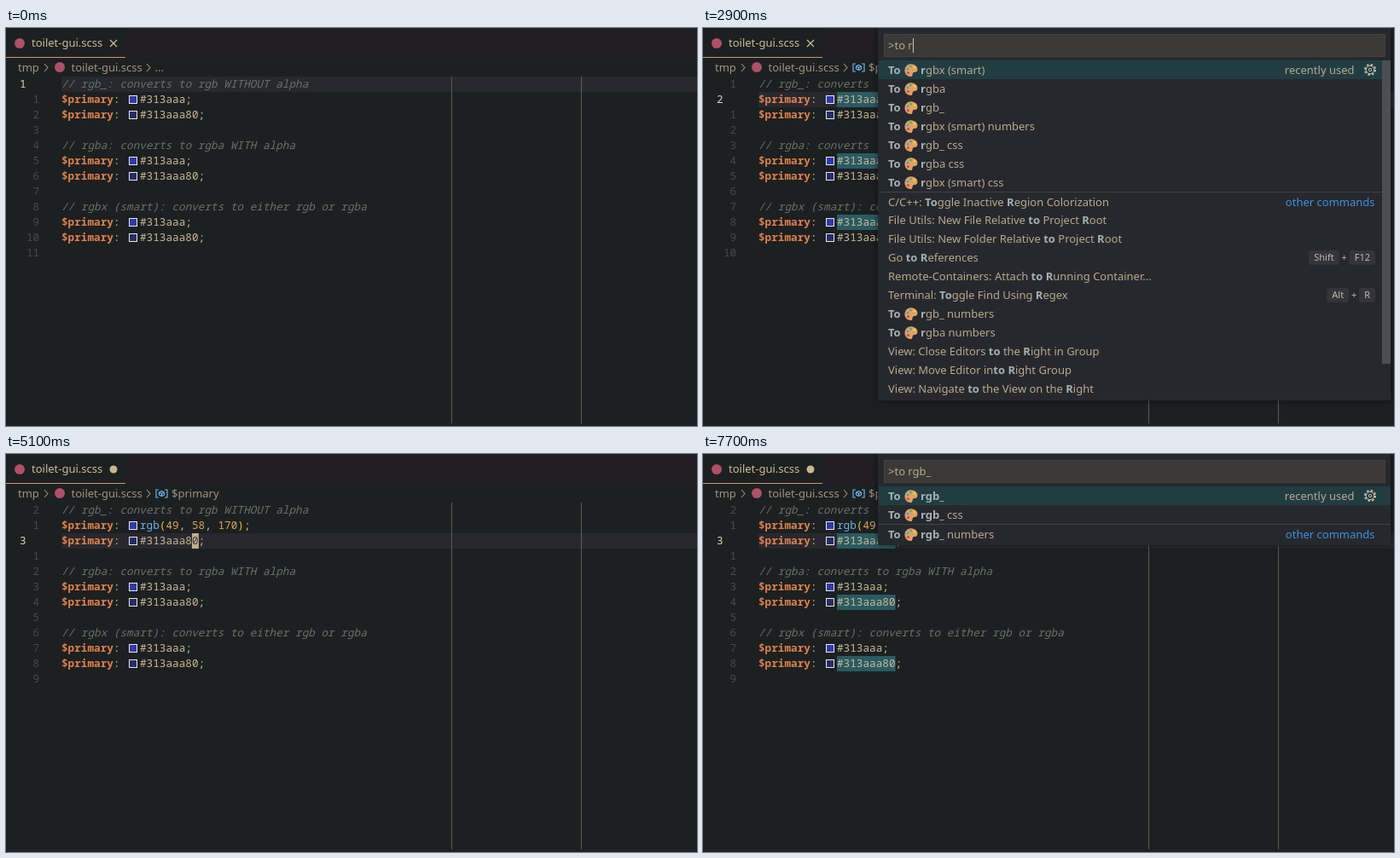
An HTML page that plays this animation: 810x467 px, repeating every 8000 ms.

```html
<!DOCTYPE html>
<html lang="en">
<head>
<meta charset="utf-8">
<title>Colour conversion in an editor</title>
<style>
  html, body { margin: 0; width: 100%; height: 100%; overflow: hidden; background: #1d2021; }
  svg { display: block; width: 810px; height: 467px; }
  text { white-space: pre; font: 13px "Noto Sans", "Open Sans", sans-serif; fill: #b8aa8c; }
  .code { font: 500 12.7px "Noto Sans Mono", "DejaVu Sans Mono", monospace; fill: #c9ba96; }
  .note { font-style: italic; font-weight: 400; fill: #68716c; }
  .var { font-weight: 600; fill: #df824e; }
  .num { fill: #45494b; }
  .now { fill: #ddd2b8; }
  .fn { fill: #6cb4e6; }
  .par { fill: #f0c334; }
  .val { fill: #dca556; }
  .match { font-weight: 700; fill: #a5b3b1; }
  .link { fill: #3e90e0; }
  .key { font-size: 11px; fill: #c4bba6; }
  .path { fill: #a0947c; }
  .tab { fill: #cdbd98; }
  .under { fill: #3c3a35; }
  .box { filter: drop-shadow(0 0 4px rgba(0, 0, 0, .5)); }
</style>
</head>
<body>
<svg id="stage" viewBox="0 0 810 467"></svg>
<script>
const LOOP = 8000, CW = 7.62, LEFT = 65, VALUE = 157, ROW = 22;
const stage = document.getElementById('stage');
const pen = document.createElement('canvas').getContext('2d');

const textWidth = (s, size = 13) => {
  pen.font = `${size}px "Noto Sans", "Open Sans", sans-serif`;
  return pen.measureText(s).width;
};
const esc = s => s.replace(/&/g, '&amp;').replace(/</g, '&lt;').replace(/>/g, '&gt;');
const rect = (x, y, w, h, fill, more = '') =>
  `<rect x="${x}" y="${y}" width="${w}" height="${h}" fill="${fill}" ${more}/>`;
const dot = (x, y, r, fill, more = '') => `<circle cx="${x}" cy="${y}" r="${r}" fill="${fill}" ${more}/>`;
const stroke = (d, color, w = 1) => `<path d="${d}" fill="none" stroke="${color}" stroke-width="${w}"/>`;
const label = (x, y, s, cls = '', more = '') =>
  `<text x="${x}" y="${y}" class="${cls}" ${more}>${esc(s)}</text>`;
const END = 'text-anchor="end"';

// Text between asterisks is emphasised.
const rich = (x, y, s) => `<text x="${x}" y="${y}">` + s.split('*').map((p, i) =>
  i % 2 ? `<tspan class="match">${esc(p)}</tspan>` : esc(p)).join('') + '</text>';

/* ---- editor ---- */
const HEX = '#313aaa', HEXA = '#313aaa80';
const LINES = [
  '// rgb_: converts to rgb WITHOUT alpha', HEX, HEXA, '',
  '// rgba: converts to rgba WITH alpha', HEX, HEXA, '',
  '// rgbx (smart): converts to either rgb or rgba', HEX, HEXA, ''
];
const RGB = [['fn', 'rgb'], ['par', '('], ['val', '49'], ['', ', '], ['val', '58'],
  ['', ', '], ['val', '170'], ['par', ')'], ['', ';']];
const lineY = n => 57 + 18 * (n - 1);
const chevron = x => stroke(`M${x} 42l4 4.5-4 4.5`, '#a0947c', 1.1);

function header(s) {
  const out = rect(0, 0, 810, 35, '#221f22') + rect(0, 0, 140, 35, '#1d2021') +
    rect(0, 34, 140, 1, '#c39a70') +
    dot(16, 18, 6, '#b04f68') + label(30, 22, 'toilet-gui.scss', 'tab') +
    (s.dirty ? dot(126, 18, 4.5, '#c6b792')
      : stroke('M122 14l8 8M130 14l-8 8', '#cdbd98', 1.2)) +
    label(14, 51, 'tmp', 'path') + chevron(45) +
    dot(63, 46, 6, '#b04f68') + label(76.5, 51, 'toilet-gui.scss', 'path') + chevron(165);
  if (!s.crumb) return out + label(174.5, 51, '...', 'path');
  return out + label(194, 51, '$primary', 'path') + stroke(
    'M179 42h-3v9h3M186 42h3v9h-3M179.5 45l3-1.5 3 1.5v3l-3 1.5-3-1.5zl3 1.5 3-1.5M182.5 46.5v3',
    '#6cb4e6', 1.2);
}

function codeLine(str, n, s) {
  const y = lineY(n), base = y + 13;
  if (!str) return '';
  if (str.startsWith('/')) return label(LEFT, base, str, 'code note');
  let out = '';
  if (s.mark === '$primary') out += rect(LEFT, y, 8 * CW, 18, '#2a5a62');
  if (s.mark === str && !(s.dirty && n === 2)) out += rect(VALUE, y, str.length * CW, 18, '#2a5a62');
  out += label(LEFT, base, '$primary', 'code var') + label(LEFT + 8 * CW, base, ':', 'code') +
    rect(144.5, y + 4.5, 9, 9, str === HEX ? '#313aaa' : '#272d65', 'stroke="#e8e8e8"');
  let x = VALUE;
  for (const [cls, part] of s.dirty && n === 2 ? RGB : [['', str + ';']]) {
    out += label(x, base, part, 'code ' + cls);
    x += part.length * CW;
  }
  return out;
}

function editor(s) {
  let out = rect(LEFT, lineY(s.row), 745, 18, '#28282e') +
    rect(522, 57, 1, 410, '#5b5a58') + rect(674, 57, 1, 410, '#5b5a58');
  LINES.forEach((str, i) => {
    const n = i + 1, base = lineY(n) + 13;
    out += n === s.row ? label(16, base, String(n), 'code now')
      : label(39.2, base, String(Math.abs(n - s.row)), 'code num', END);
    out += codeLine(str, n, s);
  });
  if (s.cursor) {
    const [x, ch] = s.cursor, y = lineY(s.row);
    out += rect(x, y, 8, 18, '#bdae8e') + label(x, y + 13, ch, 'code under');
  }
  return out + rect(0, 464, 810, 3, '#221f22');
}

/* ---- command palette ---- */
const TAIL = ['rgbx (smart) numbers', 'rgb_ css', 'rgba css', 'rgbx (smart) css'];
const RECENT = [
  ['#hex_', 'rgbx (smart)', 'rgba', 'rgb_', '#hex (smart)', ...TAIL],
  ['rgb_', '#hex_', 'rgbx (smart)', 'rgba', '#hex (smart)', ...TAIL]
];
const MORE = ['rgb_ numbers', 'rgba numbers'];
const FOR_TO = [
  { name: 'Live Server: S*to*p Live Server', keys: 'Alt+L Alt+C' },
  { name: 'ESLint: Fix all au*to*-fixable Problems' },
  { name: 'Debug: *To*ggle Skipping this File' },
  { name: 'Terminal: Create New Terminal in Editor Area *to* the Side' },
  { name: 'Material *T*heme Icons: Fix icons accent. Based *o*n Material Theme', brush: true, other: true },
  { name: 'Add Cursors *To* Bottom' },
  { name: 'Add Cursors *to* Line Ends', keys: 'Shift+Alt+I' },
  { name: 'Add Cursors *To* Top' },
  { name: 'Add Selection *To* Next Find Match', keys: 'Alt+D' }
];
const FOR_R = [
  { name: 'C/C++: *To*ggle Inactive *R*egion Colorization', other: true },
  { name: 'File Utils: New File Relative *to* Project *R*oot' },
  { name: 'File Utils: New Folder Relative *to* Project *R*oot' },
  { name: 'Go *to* *R*eferences', keys: 'Shift+F12' },
  { name: 'Remote-Containers: Attach *to* *R*unning Container...' },
  { name: 'Terminal: *To*ggle Find Using *R*egex', keys: 'Alt+R' }
];
const FOR_VIEW = [
  { name: 'View: Close Editors *to* the *R*ight in Group' },
  { name: 'View: Move Editor in*to* *R*ight Group' },
  { name: 'View: Navigate *to* the View on the *R*ight' }
];

function commands(query, round) {
  const arg = query.slice(3);
  const convert = name => name[0] === '#' ? { name: '*To* ' + name }
    : { paint: true, name: arg ? `*${arg}*${name.slice(arg.length)}` : name };
  const pick = list => list.filter(n => n.startsWith(arg)).map(convert);
  const recent = pick(RECENT[round]), more = pick(MORE);
  if (!arg) return [...recent, ...FOR_TO];
  if (arg === 'r') return [...recent, ...FOR_R, ...more, ...FOR_VIEW];
  more[0].other = true;
  if (arg === 'rg') more.push({ name: 'View: Move Editor in*to* *R*ight *G*roup' });
  return [...recent, ...more];
}

const paint = y =>
  `<path d="M236.5 ${y + 1}c0-5 4-8.5 9-7.5 5 1 7 5 5.5 8-1.5 2.5-4 .5-5 2.5s0 4-2.5 4c-4 0-7-3-7-7z" fill="#dfa266"/>` +
  dot(240, y - 1, 1.6, '#4c9be0') + dot(243.5, y - 4, 1.6, '#5fae57') +
  dot(248, y - 3, 1.6, '#e7d04c') + dot(240.5, y + 3.5, 1.6, '#d5484a');
const brush = y => stroke(`M222.5 ${y + 2}l8-8.5`, '#3f8fd2', 2.6) +
  stroke(`M218 ${y + 6}q1-4 4-4`, '#c98a54', 3);
const gear = y => dot(782, y, 6, 'none', 'stroke="#c9c1ac" stroke-width="2" stroke-dasharray="2.4 2.31"') +
  dot(782, y, 4.7, 'none', 'stroke="#c9c1ac"') + dot(782, y, 1.7, 'none', 'stroke="#c9c1ac"');

function badges(keys, y) {
  let x = 788, out = '';
  for (const chord of keys.split(' ').reverse()) {
    chord.split('+').reverse().forEach((key, i) => {
      if (i) {
        out += label(x - 6, y + 4, '+', 'key', 'text-anchor="middle"');
        x -= 12;
      }
      const w = textWidth(key, 11) + 12;
      x -= w;
      out += rect(x, y - 8, w, 17, '#34353c', 'rx="3"') + label(x + 6, y + 4, key, 'key');
    });
    x -= 10;
  }
  return out;
}

function palette({ query, round, caret }) {
  const rows = commands(query, round), full = rows.length === 18;
  const w = full ? 590 : 600;
  const emphasis = name => query === '' ? name.replace(/\*/g, '')
    : query === 't' ? name.replace(/\*(.)(.*?)\*/g, '*$1*$2') : name;
  let out = rect(205, 0, 601, 41 + rows.length * ROW, '#27282e', 'class="box"') +
    rect(212.5, 7.5, 587, 26, '#3a3937', 'stroke="#45413e"') + label(217, 25, '>' + query);
  if (caret) out += rect(Math.round(217 + textWidth('>' + query)), 12, 1, 17, '#d5c8a8');
  out += rect(206, 38, w, ROW, '#223d42');
  rows.forEach((r, i) => {
    const y = 49 + i * ROW + (r.other ? 1 : 0), base = y + 5, name = emphasis(r.name);
    if (r.other) {
      out += rect(206, 38 + i * ROW, w, 1, '#414248') +
        label(787.5, base, 'other commands', 'link', END);
    }
    if (r.paint) out += rich(217, base, emphasis('*To*')) + paint(y) + rich(255, base, name);
    else if (r.brush) out += brush(y) + rich(236, base, name);
    else out += rich(217, base, name);
    if (r.keys) out += badges(r.keys, y);
  });
  out += label(763.5, 54, 'recently used', '', END) + gear(49);
  if (full) out += rect(796, 38, 10, query === 'to r' ? 356 : 20, '#4d4e53');
  return out;
}

/* ---- timeline: each step changes part of the state ---- */
const at = n => VALUE + n * CW;
const QUERIES = ['t', 'to', 'to r', 'to rg', 'to rgb', 'to rgb_'];
const typed = (...times) => times.map((time, i) => [time, { query: QUERIES[i] }]);
const STEPS = [
  [0, { row: 1, cursor: null, mark: '', crumb: false, dirty: false, query: null, caret: true, round: 0 }],
  [300, { cursor: [LEFT, '/'] }],
  [700, { row: 2, cursor: [LEFT, '$'] }],
  [900, { crumb: true }],
  [1100, { cursor: [LEFT + CW, 'p'], mark: '$primary' }],
  [1200, { cursor: [LEFT + 8 * CW, ':'], mark: '' }],
  [1400, { cursor: [at(0), '#'] }],
  [1700, { cursor: [at(6), 'a'] }],
  [1900, { mark: HEX }],
  [2200, { query: '', cursor: null }],
  ...typed(2700, 2800, 2900, 3100, 3300, 3500),
  [4000, { caret: false }],
  [4200, { query: null, mark: '', dirty: true, caret: true, cursor: [at(15), ')'] }],
  [4700, { row: 3, cursor: [at(8), '0'] }],
  [5000, { cursor: [at(0), '#'], mark: HEXA }],
  [5100, { cursor: [at(8), '0'], mark: '' }],
  [5400, { mark: HEXA }],
  [5600, { query: '', cursor: null, round: 1 }],
  ...typed(6000, 6100, 6500, 6700, 6900, 7100),
  [7700, { caret: false }]
];

let shown = 0;
function frame(now) {
  const t = now % LOOP;
  const steps = STEPS.filter(([time]) => time <= t);
  if (steps.length !== shown) {
    shown = steps.length;
    const s = Object.assign({}, ...steps.map(([, change]) => change));
    stage.innerHTML = rect(0, 0, 810, 467, '#1d2021') + header(s) + editor(s) +
      (s.query === null ? '' : palette(s));
  }
  requestAnimationFrame(frame);
}
frame(performance.now());
</script>
</body>
</html>
```
